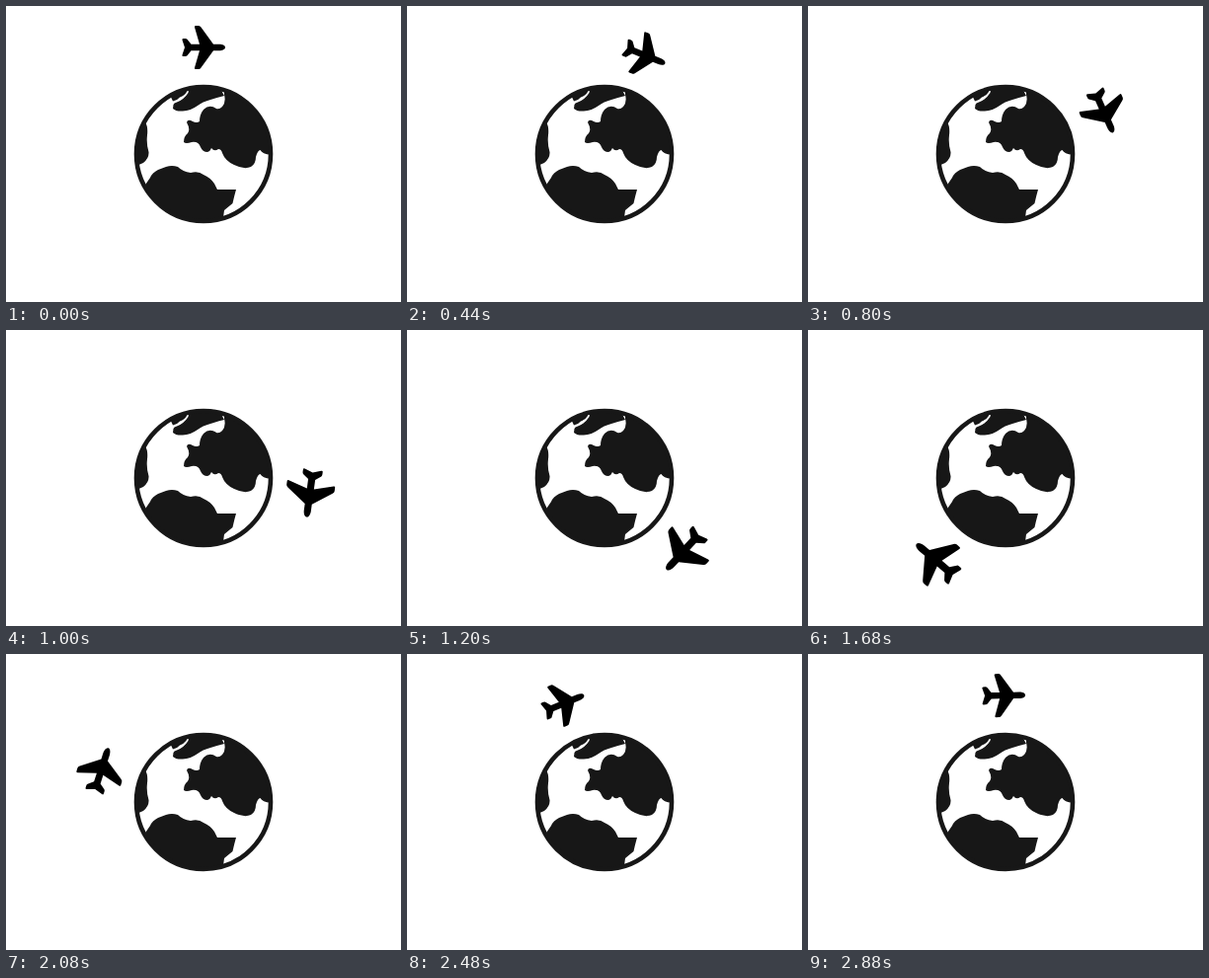
Recreate the animation shown at these times as an HTML page. Size 400 by 300 pixels, loop 2.92 s.

```html
<!DOCTYPE html>
<html lang="en">
<head>
<meta charset="utf-8">
<title>Plane around the globe</title>
<style>
  html, body { margin: 0; width: 100%; height: 100%; overflow: hidden; background: #fff; }
  svg { display: block; width: 100%; height: 100%; }
  .land { fill: #171717; }
</style>
</head>
<body>
<svg viewBox="0 0 400 300">
  <clipPath id="disc"><circle cx="200" cy="150" r="68"/></clipPath>
  <g class="land" clip-path="url(#disc)">
    <path d="M164 86 L169 96.500 Q173 96 176 92.500 Q181 90.500 183 87 L184 78Z"/>
    <path d="M169.500 100 Q170 98 173 97.500 Q180 95 184.500 88 L186 80 H215 L221 91
             Q213 93 207 95 Q199 97 194 101 Q187 106 179 106.500 Q172 107 169 104Z"/>
    <path d="M221 90 Q223 97 219 102 Q216 105 213 104 Q206 99 200 105 Q196 110 196 117
             Q193 119 189 117 Q184 114 183 118 Q187 125 184 129 Q180 132 180 138
             Q182 140 188 138 Q195 137 197 143 Q199 148 204 148 Q207 147 208 144
             Q211 148 215 145 Q218 145 219 149 Q222 157 231 161 Q241 166 248 163
             Q253 160 253 153 Q255 146 257.500 146 Q260 151 272 151 V80 H221Z"/>
    <path d="M128 118 H141 Q144 122 143 131 Q142 140 144.500 148 Q145 154 139 159 L132 162Z"/>
    <path d="M136 188 Q142 180 146 174 Q148 169 154 166 L162 163 Q168 161 174 163
             Q179 168 187 169 Q195 167 200 171 Q207 174 211 180 L214 186 H233
             Q231 193 229.500 200 L221 207 L219 222 H130Z"/>
  </g>
  <circle cx="200" cy="150" r="68" fill="none" stroke="#171717" stroke-width="4.600"/>
  <path id="plane" d="M22 0 C22 -2 19 -3.200 16 -3.200 H10 L-2.500 -20.500 Q-3.500 -22 -5 -22 H-8
    Q-9.500 -22 -9 -20.500 L-4 -3.200 H-12.500 L-16.500 -8.300 Q-17 -9 -18.500 -9 H-20.500
    Q-22 -9 -21.500 -7.500 L-19 0 L-21.500 7.500 Q-22 9 -20.500 9 H-18.500 Q-17 9 -16.500 8.300
    L-12.500 3.200 H-4 L-9 20.500 Q-9.500 22 -8 22 H-5 Q-3.500 22 -2.500 20.500
    L10 3.200 H16 C19 3.200 22 2 22 0Z"/>
</svg>
<script>
  const LOOP = 2920, STEP = 40, ORBIT = 108.7, CENTER_Y = 150.7;
  const plane = document.getElementById('plane');

  // Eased full turn that arrives slightly short before the loop restarts.
  function angleAt(time) {
    const s = time / LOOP;
    return 360 * s * s * (3 - 2 * s) - 0.9 * s ** 8;
  }

  function draw(now) {
    const time = Math.floor((now % LOOP) / STEP) * STEP;
    const angle = time < 2 * STEP ? 0 : angleAt(time);
    // The plane grows towards the bottom of its orbit.
    const scale = 1 + 0.1 * (1 - Math.cos(angle * Math.PI / 180));
    plane.setAttribute('transform',
      `translate(200 ${CENTER_Y}) rotate(${angle}) translate(0 ${-ORBIT}) scale(${scale})`);
  }

  let start;
  function tick(now) {
    start ??= now;
    draw(now - start);
    requestAnimationFrame(tick);
  }
  draw(0);
  requestAnimationFrame(tick);
</script>
</body>
</html>
```
